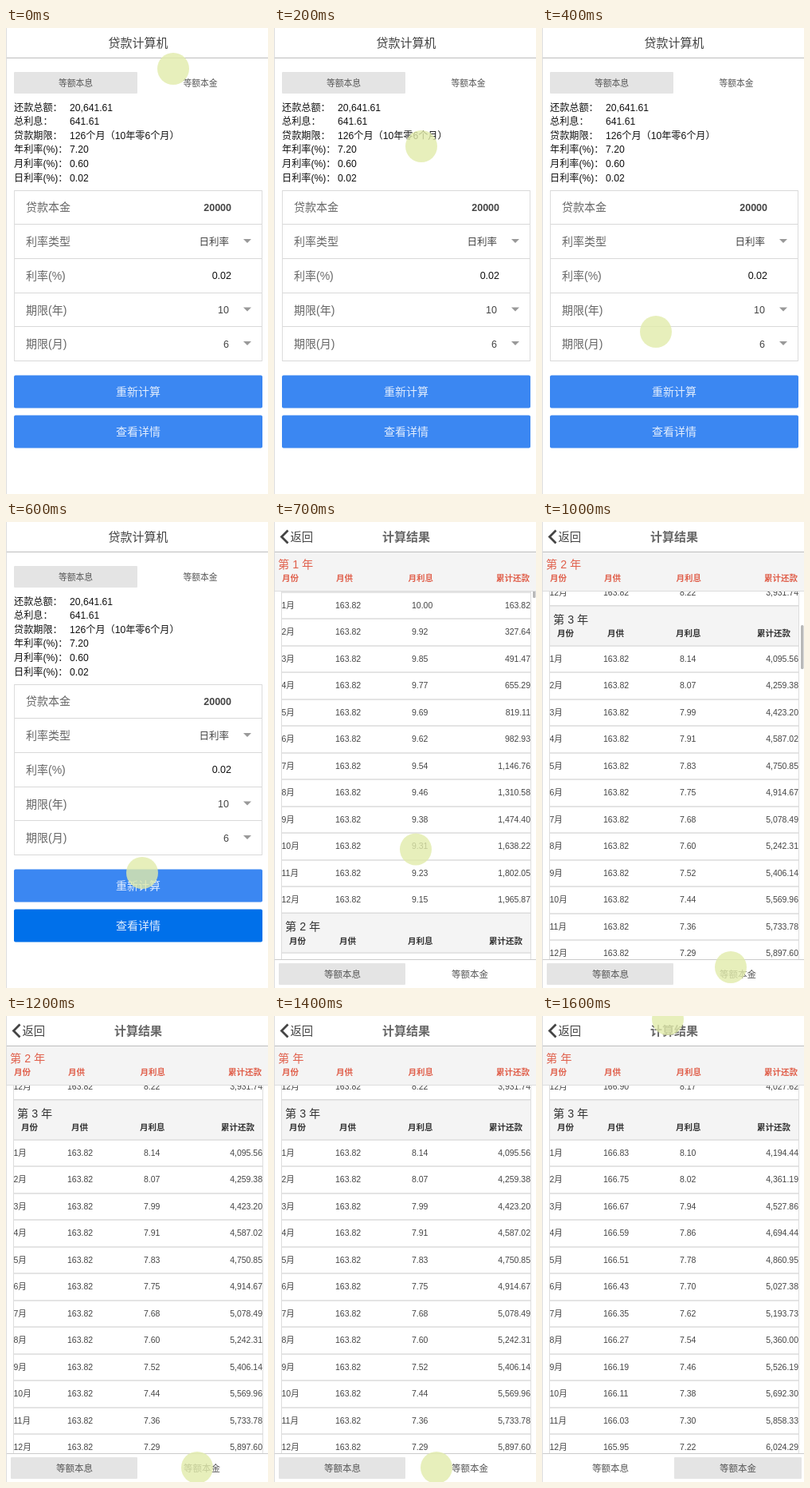
An HTML page with a canvas for the animation above (1700 ms loop, 329 by 583 pixels).

```html
<!DOCTYPE html>
<html lang="zh-CN">
<head>
<meta charset="utf-8">
<title>贷款计算机</title>
<style>
  html, body { margin: 0; overflow: hidden; background: #fff; }
  canvas { display: block; width: 329px; height: 583px; }
</style>
</head>
<body>
<canvas id="stage"></canvas>
<script>
const W = 329, H = 583, LOOP = 1700, STEP = 100;
const FONT = '"Liberation Sans", "Noto Sans CJK SC", "Noto Sans CJK", sans-serif';
const PRINCIPAL = 20000, MONTHS = 126, RATE = 0.0005;
const ROW = 33.45, HEAD = 50, YEAR = HEAD + 12 * ROW;

// [time, x, y] of the touch dot and [time, offset] of the list
const TOUCH = [[0, 210, 51], [100, 206, 46], [200, 185, 148], [400, 143, 380], [500, 157, 509],
  [600, 171, 439], [800, 185, 380], [1000, 237, 557], [1200, 240, 565], [1400, 204, 565],
  [1500, 182, 285], [1600, 158, 4]];
const SCROLL = [[700, 0], [800, 465.8], [900, 765], [1000, 835.8]];

const canvas = document.getElementById('stage');
const ctx = canvas.getContext('2d');
const dpr = window.devicePixelRatio || 1;
canvas.width = W * dpr;
canvas.height = H * dpr;

function sample(keys, t) {
  const i = keys.findIndex(k => k[0] >= t);
  if (i < 0) return keys[keys.length - 1].slice(1);
  if (i === 0) return keys[0].slice(1);
  const a = keys[i - 1], b = keys[i], p = (t - a[0]) / (b[0] - a[0]);
  return a.slice(1).map((v, j) => v + (b[j + 1] - v) * p);
}

function rect(x, y, w, h, color, radius = 0) {
  ctx.fillStyle = color;
  ctx.beginPath();
  ctx.roundRect(x, y, w, h, radius);
  ctx.fill();
}

// y is the vertical centre of the glyphs
function text(str, x, y, size, color, align = 'left', weight = 400) {
  ctx.font = `${weight} ${size}px ${FONT}`;
  ctx.textAlign = align;
  ctx.fillStyle = color;
  ctx.fillText(str, x, y + size * 0.37);
}

function titleBar(title, color, weight) {
  rect(0, 0, W, 37, '#fff');
  rect(0, 37, W, 1, '#bdbdbd');
  text(title, 166, 18.5, 15, color, 'center', weight);
}

function tabs(x, y, w, size, selected) {
  rect(selected ? 166 : x, y, selected ? 160 : w, 27, '#e4e4e4', 1);
  text('等额本息', size > 11 ? 86 : 87.5, y + 13.6, size, '#555', 'center');
  text('等额本金', size > 11 ? 246 : 244, y + 13.6, size, '#555', 'center');
}

function button(label, y, color) {
  rect(10, y, 312, 41, color, 2);
  text(label, 166, y + 20.5, 14, '#e2edfd', 'center');
}

function formPage(t) {
  titleBar('贷款计算机', '#444', 500);
  tabs(10, 55, 155, 10.8, 0);

  [['还款总额：', '20,641.61'], ['总利息：', '641.61'], ['贷款期限：', '126个月（10年零6个月）'],
    ['年利率(%)：', '7.20'], ['月利率(%)：', '0.60'], ['日利率(%)：', '0.02']
  ].forEach(([label, value], i) => {
    const y = 99.3 + i * 17.55;
    text(label, 10, y, 12.15, '#111');
    text(value, 80, y, 12.15, '#111');
  });

  [['贷款本金', '20000'], ['利率类型', '日利率'], ['利率(%)', '0.02'], ['期限(年)', '10'], ['期限(月)', '6']
  ].forEach(([label, value], i) => {
    const y = 224.3 + i * 42.7, isSelect = i % 2 === 1 || i === 4;
    rect(10, Math.floor(203 + i * 42.7), 312, 1, '#d9d9d9');
    text(label, 25, y, 14, '#666');
    text(value, isSelect ? 280 : 283, y, 12.5, i === 2 ? '#111' : '#444', 'right', i ? 400 : 700);
    if (isSelect) {
      ctx.fillStyle = '#999';
      ctx.beginPath();
      ctx.moveTo(298, y - 3);
      ctx.lineTo(308, y - 3);
      ctx.lineTo(303, y + 2);
      ctx.fill();
    }
  });
  rect(10, 416, 312, 1, '#d9d9d9');
  rect(10, 203, 1, 214, '#ddd');
  rect(321, 203, 1, 214, '#ddd');

  button('重新计算', 434.5, '#3b87f2');
  button('查看详情', 484.5, t >= 500 ? '#0070ea' : '#3b87f2');
}

function money(v) {
  return v.toLocaleString('en-US', { minimumFractionDigits: 2, maximumFractionDigits: 2 });
}

// Payment, interest and running total for every month
function schedule(equalPrincipal) {
  const fixed = PRINCIPAL * RATE / (1 - (1 + RATE) ** -MONTHS);
  let balance = PRINCIPAL, total = 0;
  return Array.from({ length: MONTHS }, () => {
    const interest = balance * RATE;
    const payment = equalPrincipal ? PRINCIPAL / MONTHS + interest : fixed;
    balance -= payment - interest;
    total += payment;
    return [payment, interest, total].map(money);
  });
}
const plans = [schedule(false), schedule(true)];

function heading(year, x, y, columns, color) {
  text(`第 ${year}年`, x, y, 14.2, color, 'left', 500);
  ['月份', '月供', '月利息', '累计还款'].forEach((name, i) =>
    text(name, columns[i], y + 17.5, 10.5, color, 'left', 700));
}

function resultPage(t) {
  const plan = t >= 1500 ? 1 : 0;
  const [offset] = sample(SCROLL, t);

  for (let year = 0; year * 12 < MONTHS; year++) {
    const top = 38 + year * YEAR - offset;
    if (top > H || top + YEAR < 38) continue;
    rect(10, top, 312, HEAD, '#f4f4f4');
    rect(10, top - 1, 312, 1.5, '#dcdcdc');
    heading(`${year + 1} `, 14, top + 16.8, [19, 82, 168, 270], '#333');
    plans[plan].slice(year * 12, year * 12 + 12).forEach(([payment, interest, total], i) => {
      const y = top + HEAD + ROW * i, middle = y + 16.12;
      rect(10, Math.round(y) - 1, 312, 2, '#e4e4e4');
      text(`${i + 1}月`, 9.5, middle, 10.5, '#444');
      text(payment, 77, middle, 10.5, '#444');
      text(interest, 173, middle, 10.5, '#444');
      text(total, 322, middle, 10.5, '#444', 'right');
    });
  }
  rect(9, 87, 1, 461, '#ddd');
  rect(322, 87, 1, 461, '#ddd');
  if (t <= 1000) rect(325, 40 + offset * 0.1065, 3.5, 55, '#b8b8b8', 1.5);

  rect(0, 38, W, 49, '#f4f4f4');
  rect(0, 86, W, 1, '#ddd');
  const current = t >= 1300 ? '' : `${Math.floor(offset / YEAR) + 1} `;
  heading(current, 5, 53, [10, 78, 168.5, 279], '#e0604c');

  titleBar('计算结果', '#666', 700);
  ctx.strokeStyle = '#444';
  ctx.lineWidth = 2.8;
  ctx.beginPath();
  ctx.moveTo(17.5, 10.5);
  ctx.lineTo(9.5, 18.5);
  ctx.lineTo(17.5, 26.5);
  ctx.stroke();
  text('返回', 20.5, 18.5, 14.3, '#444');

  rect(0, 548, W, 35, '#fff');
  rect(0, 547, W, 1, '#ccc');
  tabs(6, 552, 159, 11.5, plan);
}

function draw(now) {
  const t = Math.floor(now % LOOP / STEP) * STEP;
  ctx.setTransform(dpr, 0, 0, dpr, 0, 0);
  rect(0, 0, W, H, '#fff');
  (t < 700 ? formPage : resultPage)(t);
  rect(0, 0, 1, H, '#ddd');

  const [x, y] = sample(TOUCH, t);
  rect(x - 20, y - 20, 40, 40, 'rgba(226, 236, 171, 0.8)', 20);
}

const start = performance.now();
function tick() {
  draw(performance.now() - start);
  requestAnimationFrame(tick);
}
tick();
</script>
</body>
</html>
```
